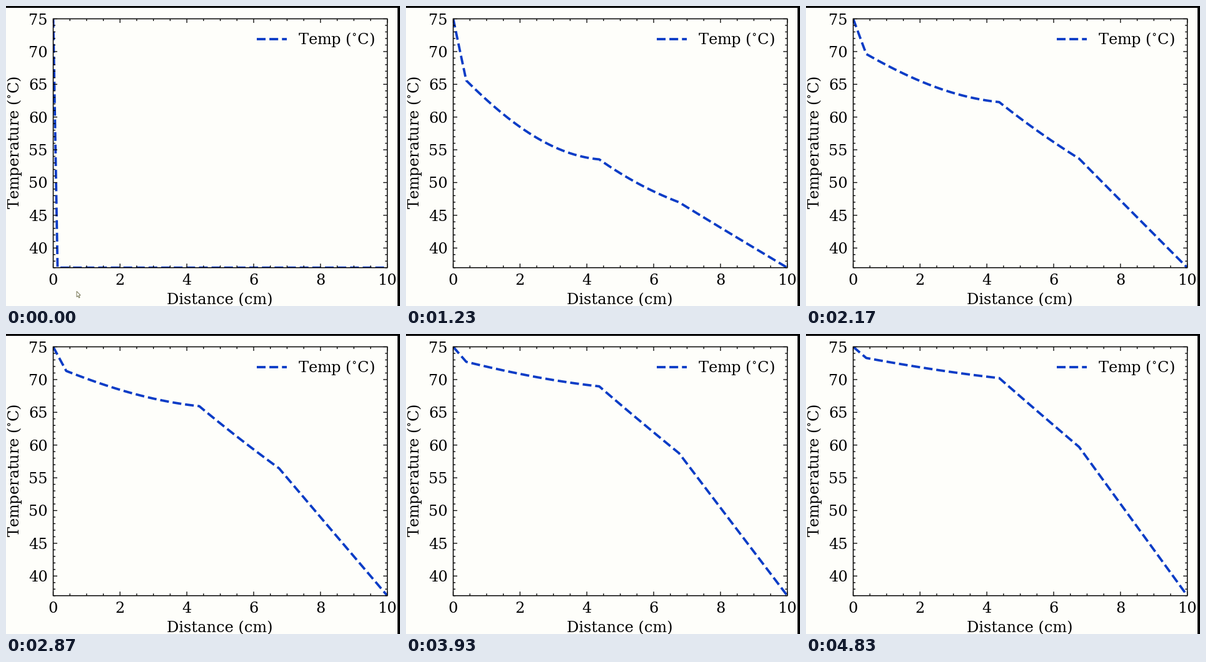
These frames come from a looping animation (630x480 px, 4.86 s). A matplotlib script:

```python
import numpy as np
import matplotlib.pyplot as plt
from matplotlib.animation import FuncAnimation
from matplotlib.collections import LineCollection
from matplotlib.patches import Polygon, Rectangle

W, H, DPI = 630, 480, 100
PT = 72 / DPI
LEFT, RIGHT, TOP, BOTTOM = 75.5, 609.7, 20.5, 418.7
HOT, COLD = 75, 37
BLUE, INK, PAPER = "#0b3cc6", "#000000", "#fefefa"
STEP = 100 / 3      # ms per solver step
TICK_MS, LOOP_MS = 20, 4860
UNIT = r"($\hspace{-0.135}^\circ\hspace{-0.135}$C)"

plt.rcParams.update({
    "font.family": "DejaVu Serif",
    "font.size": 24 * PT,
    "mathtext.fontset": "dejavuserif",
})


def px(x):
    return LEFT + (RIGHT - LEFT) * np.asarray(x) / 10


def py(temp):
    return BOTTOM - (BOTTOM - TOP) * (np.asarray(temp) - COLD) / (HOT - COLD)


# Heat conduction through four layers: end, cells, conductivity, diffusivity
LAYERS = [
    (0.39, 3, 0.371, 0.06),
    (4.37, 32, 1.730, 0.3006),
    (6.76, 19, 0.2203, 0.55),
    (10.0, 26, 0.1361, 5.0),
]


class Slab:
    def __init__(self, layers):
        nodes, cond, heat, start = [0.0], [], [], 0.0
        for end, cells, k, alpha in layers:
            dx = (end - start) / cells
            nodes += list(np.linspace(start, end, cells + 1)[1:])
            cond += [k / dx] * cells
            heat += [k / alpha * dx] * cells
            start = end
        self.x = np.array(nodes)
        cond, heat = np.array(cond), np.array(heat)
        cap = np.sqrt((heat[:-1] + heat[1:]) / 2)
        stiff = (np.diag(cond[:-1] + cond[1:])
                 - np.diag(cond[1:-1], 1) - np.diag(cond[1:-1], -1))
        drop = np.cumsum(1 / cond) / np.sum(1 / cond)
        self.steady = HOT - (HOT - COLD) * drop[:-1]
        self.rate, vecs = np.linalg.eigh(stiff / np.outer(cap, cap))
        self.modes = vecs / cap[:, None]
        self.amp = vecs.T @ (cap * (COLD - self.steady))

    def temps(self, step):
        inner = self.steady + self.modes @ (self.amp * np.exp(-self.rate * step))
        return np.concatenate(([HOT], inner, [COLD]))


slab = Slab(LAYERS)

fig = plt.figure(figsize=(W / DPI, H / DPI), dpi=DPI, facecolor=PAPER)
ax = fig.add_axes([0, 0, 1, 1])
ax.set_xlim(0, W)
ax.set_ylim(H, 0)
ax.axis("off")

# Dark window edges
ax.add_patch(Rectangle((0, 0), W, 3, color=INK, lw=0))
ax.add_patch(Rectangle((626, 0), 4, H, color=INK, lw=0))

# Frame and inward ticks on all four sides
segs = []
for v in np.arange(0, 10.01, 0.5):
    size = 6.5 if v % 2 == 0 else 3.5
    x = px(v)
    segs += [[(x, BOTTOM), (x, BOTTOM - size)], [(x, TOP), (x, TOP + size)]]
for v in range(COLD, HOT + 1):
    size = 6.5 if v % 5 == 0 else 3.5
    y = py(v)
    segs += [[(LEFT, y), (LEFT + size, y)], [(RIGHT, y), (RIGHT - size, y)]]
ax.add_collection(LineCollection(segs, colors=INK, linewidths=1.3 * PT,
                                 snap=False, zorder=4))
ax.add_patch(Rectangle((LEFT, TOP), RIGHT - LEFT, BOTTOM - TOP, fill=False,
                       ec=INK, lw=1.5 * PT, snap=False, zorder=4))


def label(x, y, text, ha="center", **kw):
    ax.text(x, y, text, ha=ha, va="baseline", color=INK, **kw)


for v in range(0, 11, 2):
    label(px(v), 445.5, str(v))
for v in range(40, 76, 5):
    label(67, py(v) + 9, str(v), ha="right")
label(342, 477.5, "Distance (cm)")
label(21.5, 218.7, "Temperature " + UNIT, rotation=90, rotation_mode="anchor")
label(467, 61.5, "Temp " + UNIT, ha="left")

style = dict(color=BLUE, lw=3.8 * PT, ls="--", dash_capstyle="butt",
             dash_joinstyle="round", zorder=3)
ax.plot([400.5, 448.5], [52.5, 52.5], **style)
curve, = ax.plot([], [], **style)
curve.set_clip_path(Rectangle((LEFT, TOP), RIGHT - LEFT, BOTTOM - TOP,
                              transform=ax.transData))

arrow = np.array([(0, 0), (0, 9), (2, 7.2), (3.6, 10.5), (5, 9.8),
                  (3.5, 6.6), (6.2, 6.4)])
pointer = Polygon(arrow + (113, 456.5), fc=PAPER, ec="#6e6e4a", lw=0.9 * PT, zorder=5)
ax.add_patch(pointer)


def update(i):
    step = int((i * TICK_MS + TICK_MS / 2 + 3.4) / STEP)
    # The first drawn state is held for one extra step
    curve.set_data(px(slab.x), py(slab.temps(max(step - 1, 0))))
    pointer.set_visible(step == 0)
    return curve, pointer


anim = FuncAnimation(fig, update, frames=LOOP_MS // TICK_MS, interval=TICK_MS,
                     init_func=lambda: update(0), repeat=True, repeat_delay=0)
plt.show()
```
